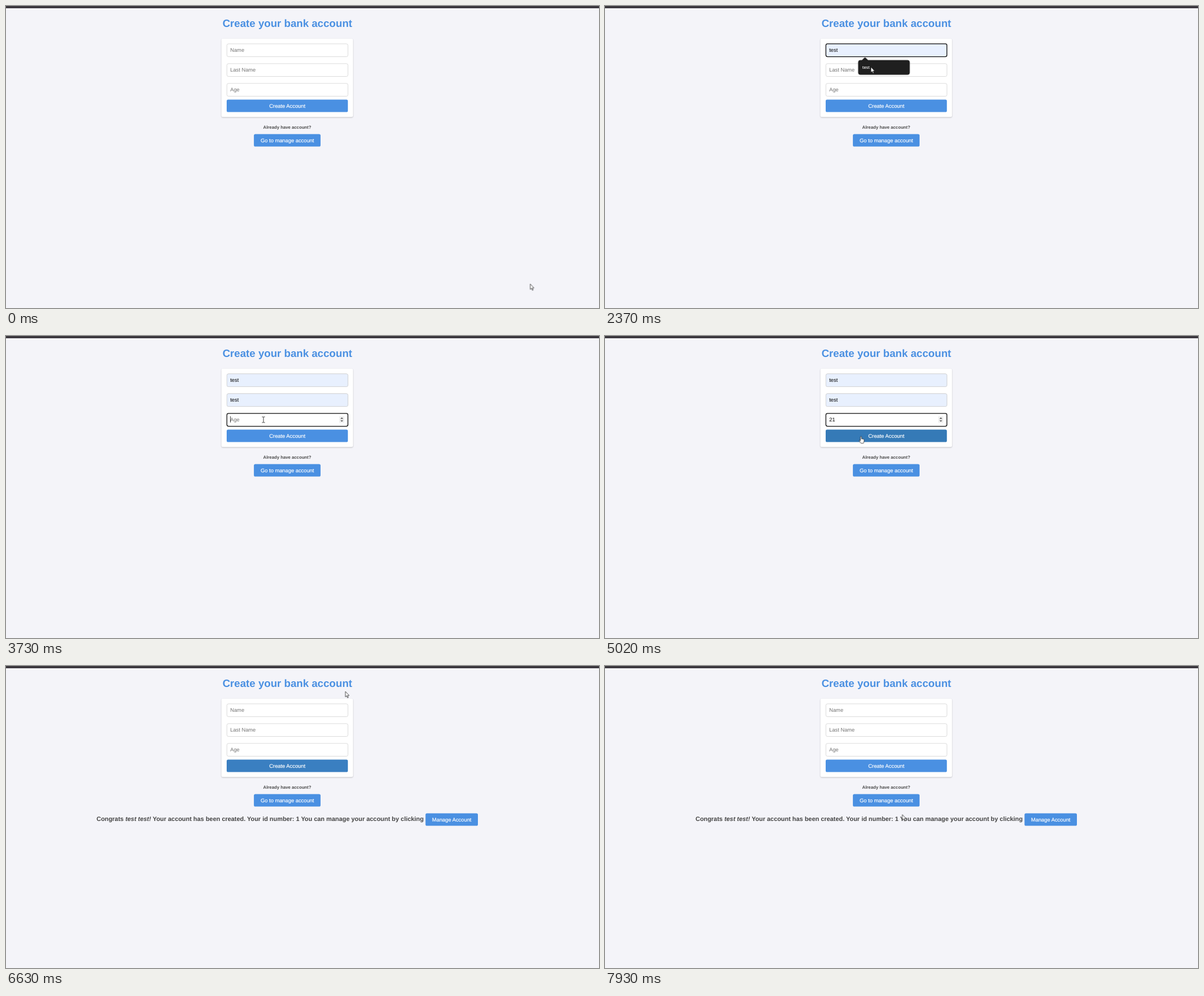
An HTML page for the animation above (8000 ms loop, 1048 px wide and 534 px high).

```html
<!DOCTYPE html>
<html lang="en">
<head>
<meta charset="utf-8">
<title>Create your bank account</title>
<style>
html, body { margin: 0; width: 100%; height: 100%; overflow: hidden; background: #f4f4f9; }
svg { display: block; width: 1048px; height: 534px; }
text { font: 9.33px "Liberation Sans", Arial, sans-serif; text-rendering: geometricPrecision; }
.mid { text-anchor: middle; }
.title { font-size: 18.67px; font-weight: bold; fill: #4a90e2; }
.hint { font-size: 7.75px; font-weight: bold; fill: #4c4c4c; }
.done { font-size: 10.92px; font-weight: bold; fill: #444; }
.ph { fill: #757575; }
.btn { fill: #4a90e2; }
.light, .ui { fill: #fff; }
.light { stroke: #fff; stroke-width: .18; }
.ui { font: 600 7px "Open Sans", "Noto Sans", sans-serif; }
.box { fill: #fff; stroke: #ccc; stroke-width: .7; }
.auto { fill: #e8f0fe; }
.ring { fill: none; stroke: #101010; stroke-width: 1.3; }
.dark { fill: #1f1f1f; }
.card { filter: drop-shadow(0 1px 1.2px rgba(0,0,0,.22)); }
.float { filter: drop-shadow(0 .5px .8px rgba(0,0,0,.3)); }

/* switches */
.sw { animation: 8s step-end infinite; }
#blank1 { animation-name: blank1; }
#blank2 { animation-name: blank2; }
#blank3 { animation-name: blank3; }
#fill1 { animation-name: fill1; }
#fill2 { animation-name: fill2; }
#one { animation-name: one; }
#two { animation-name: two; }
#focus1 { animation-name: focus1; }
#focus2 { animation-name: focus2; }
#focus3 { animation-name: focus3; }
#menu1 { animation-name: menu1; }
#menu2 { animation-name: menu2; }
#result { animation-name: result; }
#caret { animation-name: caret; }
#arrow { animation-name: arrow; }
#beam { animation-name: beam; }
#hand { animation-name: hand; }
@keyframes blank1 { 0% { opacity: 1 } 27.5% { opacity: 0 } 82% { opacity: 1 } }
@keyframes blank2 { 0% { opacity: 1 } 39.125% { opacity: 0 } 82% { opacity: 1 } }
@keyframes blank3 { 0% { opacity: 1 } 54.125% { opacity: 0 } 82% { opacity: 1 } }
@keyframes fill1 { 0% { opacity: 0 } 27.5% { opacity: 1 } 82% { opacity: 0 } }
@keyframes fill2 { 0% { opacity: 0 } 39.125% { opacity: 1 } 82% { opacity: 0 } }
@keyframes one { 0% { opacity: 0 } 54.125% { opacity: 1 } 82% { opacity: 0 } }
@keyframes two { 0% { opacity: 0 } 56.125% { opacity: 1 } 82% { opacity: 0 } }
@keyframes focus1 { 0% { opacity: 0 } 16% { opacity: 1 } 33% { opacity: 0 } }
@keyframes focus2 { 0% { opacity: 0 } 33% { opacity: 1 } 45.75% { opacity: 0 } }
@keyframes focus3 { 0% { opacity: 0 } 45.75% { opacity: 1 } 67.75% { opacity: 0 } }
@keyframes menu1 { 0% { opacity: 0 } 16.875% { opacity: 1 } 30.5% { opacity: 0 } }
@keyframes menu2 { 0% { opacity: 0 } 34% { opacity: 1 } 41.5% { opacity: 0 } }
@keyframes result { 0% { opacity: 0 } 82% { opacity: 1 } }
@keyframes caret {
  0% { opacity: 0; transform: translate(396.2px, 72px) }
  16% { opacity: 1; transform: translate(396.2px, 72px) }
  27.5% { opacity: 0; transform: translate(396.2px, 107px) }
  33% { opacity: 1; transform: translate(396.2px, 107px) }
  39.125% { opacity: 0; transform: translate(396.2px, 142px) }
  45.75% { opacity: 1; transform: translate(396.2px, 142px) }
  52.375% { opacity: 0; transform: translate(396.2px, 142px) }
  54.125% { opacity: 1; transform: translate(401.3px, 142px) }
  56.125% { opacity: 1; transform: translate(406.4px, 142px) }
  62.75% { opacity: 0; transform: translate(406.4px, 142px) }
}
@keyframes arrow {
  0% { opacity: 1 } 7.75% { opacity: 0 } 24% { opacity: 1 } 30.5% { opacity: 0 }
  38% { opacity: 1 } 41.5% { opacity: 0 } 71.25% { opacity: 1 }
}
@keyframes beam {
  0% { opacity: 0 } 7.75% { opacity: 1 } 24% { opacity: 0 } 30.5% { opacity: 1 }
  38% { opacity: 0 } 41.5% { opacity: 1 } 58.5% { opacity: 0 }
}
@keyframes hand { 0% { opacity: 0 } 58.5% { opacity: 1 } 71.25% { opacity: 0 } }

/* smooth changes */
#create { animation: hover 8s linear infinite; }
@keyframes hover {
  0%, 58.5% { fill: #4a90e2 } 61.1%, 82% { fill: #357ab7 } 85.8%, 100% { fill: #4a90e2 }
}
#dialog { animation: dialog 8s linear infinite; }
@keyframes dialog {
  0%, 66.9% { opacity: 0 } 68.2%, 81.5% { opacity: 1 } 82.2%, 100% { opacity: 0 }
}
#cursor { animation: move 8s linear infinite; }
@keyframes move {
  0% { transform: translate(926.5px, 491.5px) }
  .8% { transform: translate(926.5px, 491.5px); animation-timing-function: ease-in-out }
  8.25%, 12.3% { transform: translate(465.5px, 72px) }
  12.375%, 14.25% { transform: translate(465.5px, 71px) }
  15.1% { transform: translate(466px, 65px) }
  17.75%, 22% { transform: translate(466.3px, 77.6px) }
  27%, 30.5% { transform: translate(470px, 108px) }
  33%, 34.5% { transform: translate(452px, 113px) }
  36.4% { transform: translate(452px, 124.4px) }
  39.125%, 41.5% { transform: translate(462px, 143px) }
  45%, 56% { transform: translate(455px, 148px) }
  59.4% { transform: translate(453px, 172px) }
  61.1%, 67% { transform: translate(452.4px, 177.3px) }
  68.5%, 71.25% { transform: translate(453.9px, 176.5px) }
  76.25% { transform: translate(585.5px, 17.5px) }
  78.75%, 81.25% { transform: translate(600px, 43px) }
  85.5%, 86.25% { transform: translate(599.5px, 48.3px) }
  90.5% { transform: translate(612px, 65px) }
  93% { transform: translate(616.5px, 120px) }
  95% { transform: translate(616px, 190px) }
  97% { transform: translate(590px, 243px) }
  99.1%, 100% { transform: translate(525.5px, 262.7px) }
}
</style>
</head>
<body>
<svg viewBox="0 0 1048 534">
  <defs>
    <rect id="field" x="390.4" y="66.9" width="213.9" height="22.7" rx="2.8"/>
    <g id="menu" class="float">
      <path class="dark" d="M453 97l5.2-5.2q1.3-1.2 2.6 0L466 97z"/>
      <rect class="dark" x="447.5" y="95.7" width="91" height="25.8" rx="4"/>
      <text class="ui" x="454.8" y="111">test</text>
    </g>
  </defs>

  <rect width="1048" height="534" fill="#f4f4f9"/>
  <rect width="1048" height="4" fill="#3b383e"/>
  <text class="title mid" x="497.2" y="36.6">Create your bank account</text>

  <rect class="card" x="380.8" y="57.8" width="232.4" height="138.4" rx="2.8" fill="#fff"/>
  <use href="#field" class="box"/>
  <use href="#field" class="box" y="35"/>
  <use href="#field" class="box" y="70"/>

  <text id="blank1" class="sw ph" x="396.2" y="81.2">Name</text>
  <text id="blank2" class="sw ph" x="396.2" y="116.2">Last Name</text>
  <text id="blank3" class="sw ph" x="396.2" y="151.2">Age</text>
  <g id="fill1" class="sw">
    <use href="#field" class="box auto"/>
    <text x="396.2" y="81.2">test</text>
  </g>
  <g id="fill2" class="sw">
    <use href="#field" class="box auto" y="35"/>
    <text x="396.2" y="116.2">test</text>
  </g>
  <text id="one" class="sw" x="396.2" y="151.2">2</text>
  <text id="two" class="sw" x="401.4" y="151.2">1</text>

  <use id="focus1" class="sw ring" href="#field"/>
  <use id="focus2" class="sw ring" href="#field" y="35"/>
  <g id="focus3" class="sw">
    <use class="ring" href="#field" y="70"/>
    <rect x="589" y="142" width="9" height="11.5" fill="#efefef"/>
    <path d="M591 146.4l2.5-2.4 2.5 2.4zM591 149.2l2.5 2.4 2.5-2.4z" fill="#505050"/>
  </g>
  <rect id="caret" class="sw" width=".8" height="11"/>

  <rect id="create" x="390" y="165.5" width="214.2" height="22" rx="2.6"/>
  <text class="light mid" x="497.2" y="179.6">Create Account</text>
  <text class="hint mid" x="497" y="217.2">Already have account?</text>
  <rect class="btn" x="438.1" y="226.6" width="117.8" height="22" rx="2.6"/>
  <text class="light mid" x="497.2" y="240.7">Go to manage account</text>

  <g id="result" class="sw">
    <text class="done" x="160" y="274.4">Congrats <tspan font-style="italic">test test!</tspan> Your account has been created. Your id number: 1 You can manage your account by clicking</text>
    <rect class="btn" x="741.4" y="260.5" width="92.6" height="22" rx="2.6"/>
    <text class="light mid" x="787.7" y="274.5">Manage Account</text>
  </g>

  <use id="menu1" class="sw" href="#menu"/>
  <use id="menu2" class="sw" href="#menu" y="35"/>

  <g id="dialog">
    <rect class="dark float" x="366" y="-20" width="262.4" height="87.5" rx="5"/>
    <text class="ui" x="378" y="4.5" style="font-size:8.35px">127.0.0.1:5502 says</text>
    <text class="ui" x="378" y="20.8" style="font-size:7.1px;font-weight:400">acc created</text>
    <rect x="577.4" y="31.4" width="40.4" height="25.6" rx="11.5" fill="none" stroke="#a8c7fa" stroke-width="1.2"/>
    <rect x="579" y="33" width="37.2" height="22.4" rx="10.4" fill="#a8c7fa"/>
    <text class="ui mid" x="597.4" y="46.8" style="fill:#1b3a6b">OK</text>
  </g>

  <g id="cursor">
    <path id="arrow" class="sw" d="M0 0V9.6L2.2 7.6 3.7 11.2 5.2 10.5 3.7 7.1H6.6Z" fill="#fff" stroke="#222" stroke-width=".8"/>
    <path id="beam" class="sw" d="M-2.6-5H-.8L0-4.4 .8-5H2.6M0-4.4V4.4M-2.6 5H-.8L0 4.4 .8 5H2.6" fill="none" stroke="#222" stroke-width=".9"/>
    <path id="hand" class="sw" d="M-1 1.2Q-1 .2 0 .2T1 1.2V4.4L4.4 5.1Q5.8 5.5 5.7 7L5.2 10 4.2 12.4H0L-3 8.3Q-3.4 6.9-2.1 7L-1 8Z" fill="#fff" stroke="#222" stroke-width=".8"/>
  </g>
</svg>
</body>
</html>
```
